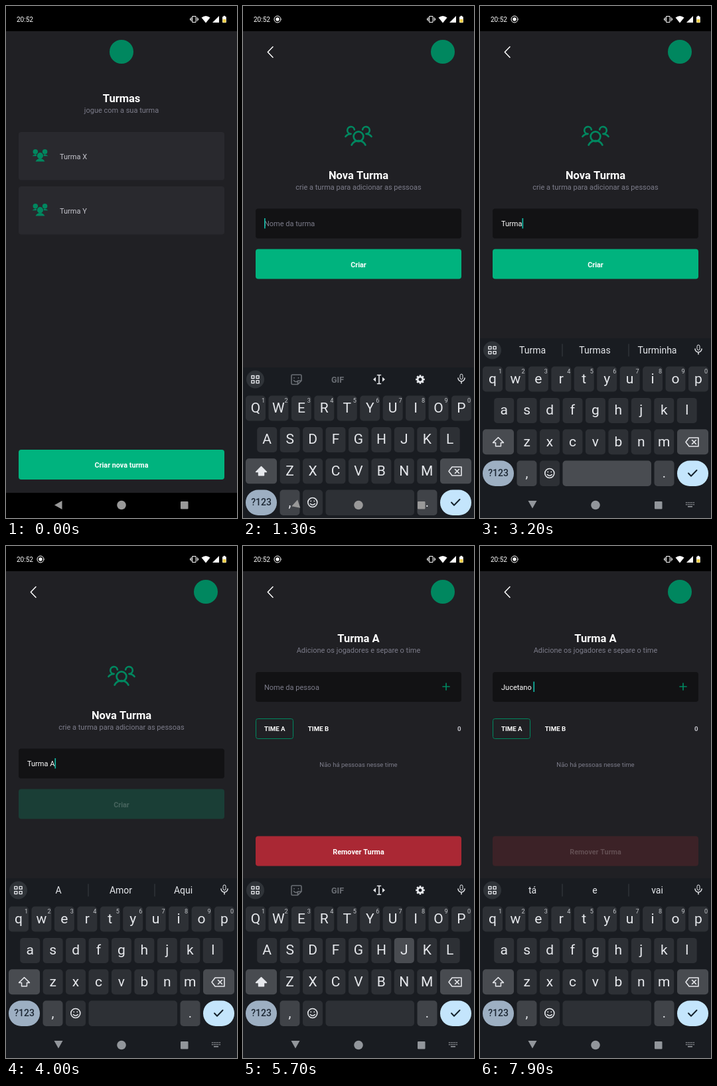
Write an HTML page with a canvas that moves like this. It is 348x772 px and loops after 8000 ms.

```html
<!DOCTYPE html>
<html lang="pt-BR">
<head>
<meta charset="utf-8">
<title>Turmas</title>
<style>
html, body { margin: 0; width: 100%; height: 100%; overflow: hidden; background: #000; }
canvas { display: block; width: 348px; height: 772px; }
</style>
</head>
<body>
<canvas id="stage"></canvas>
<script>
const W = 348, H = 772, LOOP = 8000, KB_TOP = 501, KB_HEIGHT = 271;
const BG = '#202024', CARD = '#29292e', FIELD = '#121214', GRAY = '#7c7c8a', LIGHT = '#c4c4cc';
const GREEN = '#00b37e', DARK_GREEN = '#00875f', RED = '#aa2834', CURSOR = '#12b5a2';
const KB_BG = '#191c21', KEY = '#2d3035', KEY_ALT = '#404348', KEY_HOT = '#494c51', KEY_TEXT = '#e6e8ec';

const canvas = document.getElementById('stage');
const ctx = canvas.getContext('2d');
const dpr = window.devicePixelRatio || 1;
canvas.width = W * dpr;
canvas.height = H * dpr;

// [time, text, suggestions]; the last letter's key is down for 100 ms before
const typing = [
  { focus: 1100, steps: [
    [2400, 'T', 'T Tá Tô'], [2600, 'Tu', 'Tu Tudo Tua'], [2700, 'Tur', 'Tur Turma Turno'],
    [2800, 'Turm', 'Turm Turma Turmas'], [3000, 'Turma', 'Turma Turmas Turminha'],
    [3300, 'Turma ', 'da do de'], [3700, 'Turma A', 'A Amor Aqui']] },
  { focus: 4900, steps: [
    [5800, 'J', 'J Já Jo'], [6000, 'Ju', 'Ju Junto Juiz'], [6200, 'Juc', 'Juc Já Junto'],
    [6300, 'Juce', 'Juce Já Hoje'], [6900, 'Jucet', 'Jucet Já Hoje'], [7000, 'Juceta', 'Juceta Já Hoje'],
    [7200, 'Jucetan', 'Jucetan Já Hoje'], [7300, 'Jucetano', 'Jucetano Já Hoje'],
    [7500, 'Jucetano ', 'tá e vai']] }
];

const clamp = v => Math.max(0, Math.min(1, v));
const bez = (a, b, c, d, s) =>
  a * (1 - s) ** 3 + 3 * b * s * (1 - s) ** 2 + 3 * c * s * s * (1 - s) + d * s ** 3;

// Fast start, very slow finish
function emphasized(p) {
  if (p <= 0 || p >= 1) return clamp(p);
  const [xs, ys] = p < 1 / 6
    ? [[0, .05, .1333, .16667], [0, 0, .06, .4]]
    : [[.16667, .20833, .25, 1], [.4, .82, 1, 1]];
  let lo = 0, hi = 1;
  for (let i = 0; i < 24; i++) {
    const mid = (lo + hi) / 2;
    if (bez(...xs, mid) < p) lo = mid; else hi = mid;
  }
  return bez(...ys, lo);
}

function box(x, y, w, h, r, fill) {
  ctx.fillStyle = fill;
  ctx.beginPath();
  ctx.roundRect(x, y, w, h, r);
  ctx.fill();
}

function circle(x, y, r, fill) {
  box(x - r, y - r, 2 * r, 2 * r, r, fill);
}

function text(s, x, y, size, color = '#fff', align = 'center', weight = 400) {
  ctx.font = `${weight} ${size}px Roboto, sans-serif`;
  ctx.textAlign = align;
  ctx.fillStyle = color;
  ctx.fillText(s, x, y);
}

function path(d, x, y, color, line = 0, scale = 1, turn = 0) {
  ctx.save();
  ctx.translate(x, y);
  ctx.rotate(turn);
  ctx.scale(scale, scale);
  ctx.fillStyle = ctx.strokeStyle = color;
  ctx.lineWidth = line;
  ctx.lineCap = ctx.lineJoin = 'round';
  if (line) ctx.stroke(new Path2D(d)); else ctx.fill(new Path2D(d));
  ctx.restore();
}

const ring = r => `M${r} 0a${r} ${r} 0 1 1-${2 * r} 0a${r} ${r} 0 1 1 ${2 * r} 0z`;

function button(label, y, fill, opacity) {
  ctx.save();
  ctx.globalAlpha *= opacity;
  box(19, y, 310, 45, 4, fill);
  text(label, 174, y + 27, 10.8, '#fff', 'center', 700);
  ctx.restore();
}

const pressOpacity = (t, at) =>
  t < at ? 1 : t < at + 100 ? .2 : clamp(.2 + .8 * (t - at - 100) / 250);

function entry(t, i) {
  const { focus, steps } = typing[i];
  const done = steps.filter(s => s[0] <= t);
  const [time, value, words] = done.length ? done[done.length - 1] : [focus, '', ''];
  const next = steps[done.length];
  const down = next && t >= next[0] - 100 ? next[1].slice(-1).toLowerCase() : '';
  return { value, words, down, cursor: t >= focus && (t - time) % 1000 < 500 };
}

function input(t, i, y, hint) {
  const { value, cursor } = entry(t, i);
  box(19, y, 310, 45, 4, FIELD);
  text(value || hint, 32, y + 26.5, 11, value ? '#fff' : GRAY, 'left');
  if (cursor) {
    const x = 32 + (value ? ctx.measureText(value).width : 0);
    box(x, y + 14.5, 1.7, 15.5, 0, CURSOR);
  }
}

function heading(title, sub, y) {
  text(title, 174, y, 16.5, '#fff', 'center', 700);
  text(sub, 174, y + 15.7, 11, GRAY);
}

function header() {
  path('M45 61.5L37.3 69.5 45 77.5', 0, 0, '#fff', 1.5);
  circle(301, 69, 18, DARK_GREEN);
}

function groupCard(label, y) {
  box(19, y, 310, 72.5, 4, CARD);
  const x = 38, top = y + 21;
  const icon = d => path(d, x, top, DARK_GREEN, 0, .105);
  icon('M96 84a36 36 0 1 1-72 0a36 36 0 1 1 72 0zM232 84a36 36 0 1 1-72 0a36 36 0 1 1 72 0z' +
    'M14 146a62 62 0 0 1 100 0zM142 146a62 62 0 0 1 100 0z');
  circle(x + 13.4, top + 14.7, 5.5, CARD);
  icon('M172 140a44 44 0 1 1-88 0a44 44 0 1 1 88 0zM62 224a72 72 0 0 1 132 0z');
  text(label, 81, y + 40.5, 11, LIGHT, 'left');
}

function listScreen(t) {
  circle(174, 69, 18, DARK_GREEN);
  heading('Turmas', 'jogue com a sua turma', 144.8);
  groupCard('Turma X', 190);
  groupCard('Turma Y', 272);
  button('Criar nova turma', 669, GREEN, pressOpacity(t, 100));
}

function newScreen(t) {
  const y = t < 1200 ? 116 : 0;
  header();
  path('M172 140a44 44 0 1 1-88 0a44 44 0 1 1 88 0zM196 116a59.8 59.8 0 0 1 48 24M12 140a59.8 59.8 0 0 1 48-24' +
    'M66 216a69 69 0 0 1 124 0M60 116A32 32 0 1 1 91.4 78M164.6 78A32 32 0 1 1 196 116',
    152.5, 173.3 + y, DARK_GREEN, 16, .168);
  heading('Nova Turma', 'crie a turma para adicionar as pessoas', 260.8 + y);
  input(t, 0, 305.5 + y, 'Nome da turma');
  button('Criar', 366.5 + y, GREEN, pressOpacity(t, 4000));
}

function teamScreen(t) {
  const up = t >= 5000;
  header();
  heading('Turma A', 'Adicione os jogadores e separe o time', 144.8);
  input(t, 1, 190, 'Nome da pessoa');
  path('M-5 0H5M0-5V5', 306, 212, DARK_GREEN, 1.7);
  ctx.strokeStyle = DARK_GREEN;
  ctx.lineWidth = 1;
  ctx.beginPath();
  ctx.roundRect(19.5, 260.5, 56, 30, 3);
  ctx.stroke();
  text('TIME A', 47.8, 279.4, 9.7, '#fff', 'center', 700);
  text('TIME B', 113.5, 279.4, 9.7, '#fff', 'center', 700);
  text('0', 328.5, 279.4, 9.7, LIGHT, 'right', 700);
  text('Não há pessoas nesse time', 174, up ? 332.5 : 448.5, 9.55, GRAY);
  button('Remover Turma', up ? 437.5 : 669, RED, pressOpacity(t, 7900));
}

function layer(draw, t, x, alpha = 1) {
  ctx.save();
  ctx.globalAlpha = alpha;
  ctx.translate(x, 0);
  box(0, 38, W, 696, 0, BG);
  draw(t);
  ctx.restore();
}

function screens(t) {
  const stack = [listScreen, newScreen, teamScreen], starts = [180, 4130];
  const i = t < starts[0] ? 0 : t < starts[1] ? 1 : 2;
  if (!i) return layer(stack[0], t, 0);
  const age = t - starts[i - 1], p = emphasized(age / 450), shift = W * .1;
  if (p < 1) layer(stack[i - 1], t, -shift * p);
  layer(stack[i], t, shift * (1 - p), clamp((age - 50) / 83));
}

function statusBar(t) {
  box(0, 0, W, 38, 0, '#000');
  text('20:52', 16, 23.6, 10, '#fff', 'left');
  if (t >= 100) {
    path(ring(5), 52, 20, '#fff', 1);
    circle(52, 20, 2.7, '#fff');
  }
  path('M-2.5-4.5h5v9h-5zM-4.5-2.5v5M4.5-2.5v5M-6-1v2M6-1v2', 283.5, 20, '#fff', 1);
  path('M294.5 17.5Q301 12.5 307.5 17.5L301 25.5z', 0, 0, '#fff');
  path('M321 15v10h-10z', 0, 0, '#fff');
  box(327.5, 14.8, 2.8, 2, 0, '#fff');
  box(326, 16, 5.8, 9.2, 1, '#fff');
  box(326.5, 20, 4.8, 4.7, .5, '#f4cf46');
}

function navBar(raised) {
  const color = raised < 1 ? '#999' : '#92969b';
  path('M-6 0L5.5-6.5V6.5z', 79, 752.5 - raised, color, 0, 1, -raised * Math.PI / 2);
  circle(174, 752.5, 6.8, color);
  box(263, 747, 11.5, 11.5, 1, color);
  if (raised === 1) {
    for (let i = 0; i < 10; i++) box(310 + i % 5 * 2.8, i < 5 ? 748 : 751, 1.6, 1.6, 0, color);
    box(313, 754, 7, 1.6, 0, color);
  }
}

function toolbar(words) {
  const y = 519;
  circle(18.5, y, 13.5, '#2f3338');
  for (const dx of [-3.6, 3.6]) for (const dy of [-3.6, 3.6])
    path('M-2-2h4v4h-4z', 18.5 + dx, y + dy, KEY_TEXT, 1.4);
  path('M-2-5a2 2 0 0 1 4 0v4a2 2 0 0 1-4 0z', 329, y - 1, KEY_TEXT, 1);
  path('M-5-1a5 5 0 0 0 10 0M0 4v3', 329, y - 1, KEY_TEXT, 1.5);
  if (words) {
    words.split(' ').forEach((w, i) => text(w, 79 + i * 94, y + 5, 14, KEY_TEXT));
    for (const x of [123.5, 223.5]) box(x, 509.5, 1, 19, 0, '#3b3f45');
    return;
  }
  const dim = '#6a6e74';
  path('M-6-7H6q1.5 0 1.5 1.5V2L2 7.5H-6q-1.5 0-1.5-1.5V-5.5q0-1.5 1.5-1.5zM2 7V2H7M-3.5-2.5v.5M3-2.5v.5M-4 1.5q2 3 5 1.5',
    80.5, y, dim, 1.6);
  text('GIF', 142.5, y + 4.5, 12.5, dim, 'center', 700);
  path('M-2.5-6.5h5M0-6.5v13M-2.5 6.5h5', 205, y, KEY_TEXT, 1.6);
  path('M-9 0l4-3.5v7zM9 0l-4-3.5v7z', 205, y, KEY_TEXT);
  path(ring(3.9), 267, y, KEY_TEXT, 2.8);
  for (let i = 0; i < 8; i++) path('M4.5-1.3H6.8V1.3H4.5z', 267, y, KEY_TEXT, 0, 1, i * Math.PI / 4);
}

function keyboard(t, offset) {
  const { value, words, down } = entry(t, t < 4600 ? 0 : 1);
  const caps = !value || (t >= 3500 && t < 3700);
  const fill = (key, base) => key === down ? KEY_HOT : base;
  ctx.save();
  ctx.translate(0, offset);
  box(0, KB_TOP, W, KB_HEIGHT, 0, KB_BG);
  toolbar(words);

  ['qwertyuiop', 'asdfghjkl', 'zxcvbnm'].forEach((row, r) => {
    const y = 543.5 + r * 47.4, first = [19, 36.2, 70.6][r];
    [...row].forEach((k, i) => {
      const x = first + i * 34.44;
      box(x - 15, y, 30, 38, 5, fill(k, KEY));
      text(caps ? k.toUpperCase() : k, x, y + 25.5, 21, KEY_TEXT);
      if (!r) text((i + 1) % 10, x + 11.5, y + 10.5, 9, '#c3c6ca');
    });
  });

  const shiftDown = t >= 3400 && t < 3500;
  box(4, 638.3, 47, 38, 5, shiftDown ? '#5b5e63' : '#484b50');
  const arrow = 'M0-8L9 1H4.5V7H-4.5V1H-9z';
  path(arrow, 27.5, 657.5, KEY_TEXT, 1.7, .88);
  if (caps) path(arrow, 27.5, 657.5, KEY_TEXT, 0, .88);
  box(297, 638.3, 47, 38, 5, '#484b50');
  path('M-9.5 0L-4.5-6.5H9.5V6.5H-4.5zM0-3l6 6M6-3l-6 6', 319.5, 657.5, KEY_TEXT, 1.6);

  box(4, 685.5, 47, 38.5, 19, '#9dafc2');
  text('?123', 27.5, 709.3, 14, '#1c2733', 'center', 500);
  box(55.5, 685.5, 30, 38.5, 5, KEY_ALT);
  text(',', 70.5, 711, 20, KEY_TEXT);
  box(90, 685.5, 30, 38.5, 5, KEY);
  path(ring(7) + 'M-2.5-2.2v.4M2.5-2.2v.4M-3.5 2q3.5 3.5 7 0', 104.8, 704.5, KEY_TEXT, 1.6);
  box(124.5, 685.5, 133.5, 38.5, 5, fill(' ', KEY));
  box(262.5, 685.5, 30, 38.5, 5, KEY_ALT);
  text('.', 277.5, 711, 20, KEY_TEXT);
  box(297, 685.5, 47, 38.5, 19, '#c4e5fc');
  path('M-6 0l4 4.2L6.5-4.5', 320, 704.5, '#16232e', 2);
  ctx.restore();
}

function keyboardOffset(t) {
  const rise = start => KB_HEIGHT * (1 - clamp((t - start) / 350)) ** 3;
  if (t < 4100) return rise(1142);
  return t < 4600 ? KB_HEIGHT * clamp((t - 4100) / 250) ** 2 : rise(4942);
}

function draw(t) {
  ctx.setTransform(dpr, 0, 0, dpr, 0, 0);
  box(0, 0, W, H, 0, BG);
  screens(t);
  box(0, 734, W, 38, 0, '#000');
  const offset = keyboardOffset(t);
  if (offset < KB_HEIGHT) keyboard(t, offset);
  const turn = t < 4100 ? (t - 1260) / 200 : t < 4600 ? 1 - (t - 4100) / 200 : (t - 5060) / 200;
  navBar(clamp(turn));
  statusBar(t);
}

const start = performance.now();
function tick() {
  draw((performance.now() - start) % LOOP);
  requestAnimationFrame(tick);
}
tick();
</script>
</body>
</html>
```
